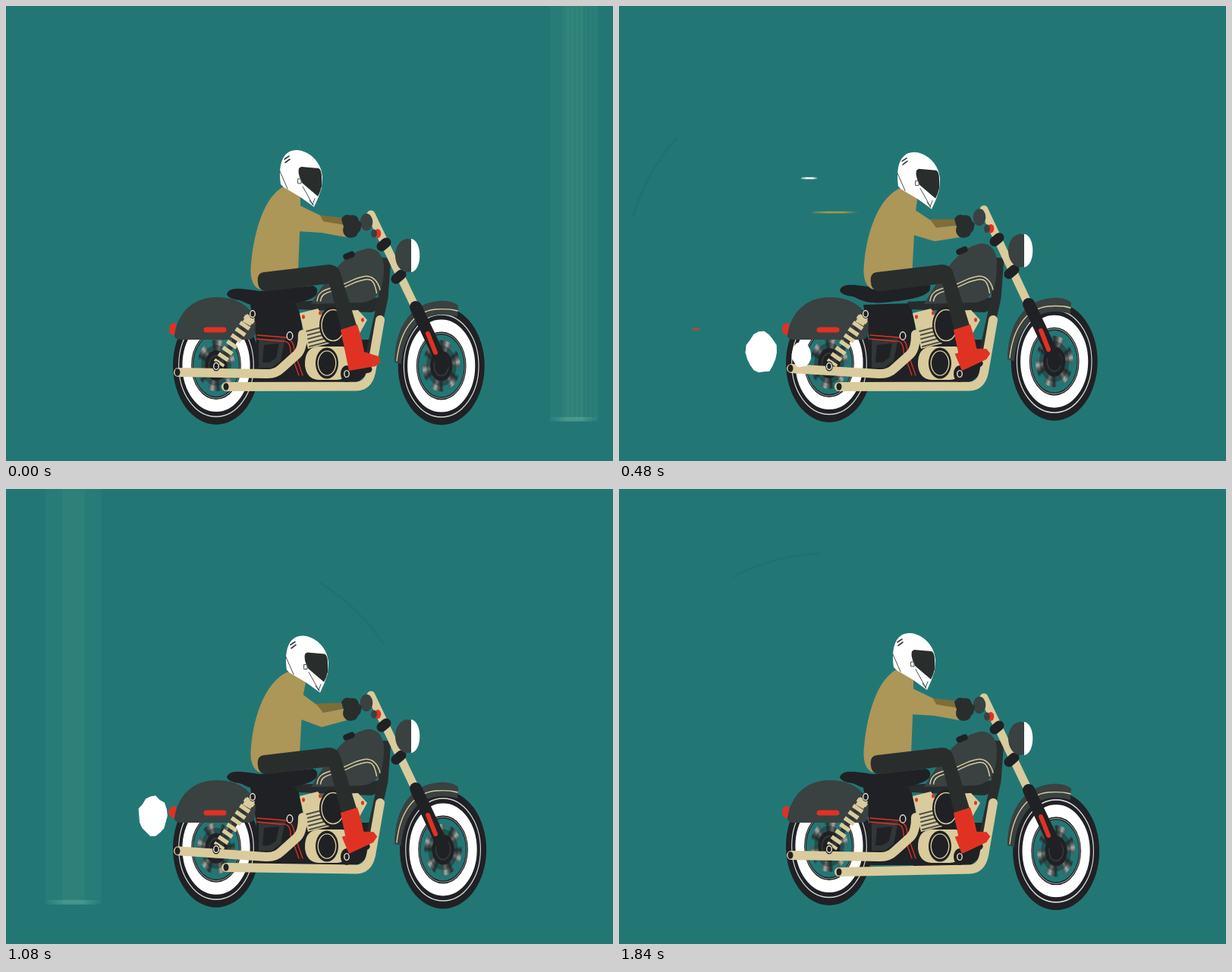
Write an HTML page with a canvas that moves like this. It is 800 px wide and 600 px high and loops after 1880 ms.

```html
<!DOCTYPE html>
<html>
<head>
<meta charset="utf-8">
<style>
html, body { margin: 0; width: 100%; height: 100%; overflow: hidden; background: #227775; }
canvas { display: block; }
</style>
</head>
<body>
<canvas id="stage" width="800" height="600"></canvas>
<script>
const c = document.getElementById('stage').getContext('2d');
const LOOP = 1880, STEP = 40, TAU = Math.PI * 2;
const BG = '#227775', BLACK = '#202124', GREY = '#394141', CREAM = '#d9cb9c', PALE = '#e7e4d4',
      TAN = '#ac9658', OLIVE = '#806c37', DARK = '#292e2d', RED = '#e03223', WHITE = '#fff';

const lerp = (a, b, k) => a + (b - a) * k;
const ramp = (t, a, b) => Math.max(0, Math.min(1, (t - a) / (b - a)));
const ease = (t, a, b) => { const k = ramp(t, a, b); return k * k * (3 - 2 * k); };
const bump = (t, peak, width) => Math.exp(-(((t - peak) / width) ** 2));
const noise = n => { const s = Math.sin(n * 127.1) * 43758.5; return s - Math.floor(s); };

const fill = (d, color) => { c.fillStyle = color; c.fill(new Path2D(d)); };
function line(d, color, width, cap = 'round', dash = []) {
  c.strokeStyle = color; c.lineWidth = width; c.lineCap = cap; c.lineJoin = 'round';
  c.setLineDash(dash);
  c.stroke(new Path2D(d));
}
function oval(x, y, rx, color, stroke, ry = rx * 1.37) {
  c.beginPath();
  c.ellipse(x, y, rx, ry, 0, 0, TAU);
  c.setLineDash([]);
  if (stroke) { c.strokeStyle = color; c.lineWidth = stroke; c.stroke(); }
  else { c.fillStyle = color; c.fill(); }
}
function bolt(x, y, r, ring, color = PALE) {
  oval(x, y, r, BLACK);
  oval(x, y, ring, color, 1.4);
}
function at(x, y, angle, draw) {
  c.save(); c.translate(x, y); c.rotate(angle); draw(); c.restore();
}
function fade(x1, x2, rgb, alpha) {
  const g = c.createLinearGradient(x1, 0, x2, 0);
  alpha.forEach((a, i) => g.addColorStop(i / (alpha.length - 1), `rgba(${rgb},${a})`));
  c.fillStyle = g;
}

function pillar(x, w, stripes) {
  c.fillStyle = 'rgba(150,210,150,.055)';
  c.fillRect(x, 0, w, 546);
  c.fillRect(x + w * .3, 0, w * .4, 546);
  c.fillStyle = 'rgba(150,210,150,.04)';
  for (let i = 0; i < stripes; i++) c.fillRect(x + w * (.25 + .75 * i / stripes), 0, 3, 546);
  fade(x, x + w, '100,180,160', [.05, .45, .45, 0]);
  c.fillRect(x, 542, w, 6);
}

// The head runs ahead, the tail follows half a duration later.
function streak(t, birth, duration, from, to, y, rgb) {
  const u = (t - birth) / duration;
  const head = lerp(from, to, ramp(u, 0, 1)), tail = lerp(from, to, ramp(u, .5, 1.5));
  fade(head, tail, rgb, [.3, 1, 1, 0]);
  c.fillRect(head, y - 1.2, tail - head, 2.5);
}

function scenery(t) {
  pillar(717 - 3 * t, 64, 8);
  pillar(875 - 3 * t, 83, 11);
  pillar(3292 - 3 * t, 74, 0);
  if (t > 80) {
    const a = (209 - 41 * (t / STEP - 12)) * Math.PI / 180;
    c.beginPath();
    c.arc(275, 352, 267, a - .22, a + .22);
    c.setLineDash([]); c.lineCap = 'round';
    c.strokeStyle = '#20716f'; c.lineWidth = 3; c.stroke();
  }
  streak(t, 90, 160, 350, 240, 211.5, '255,255,255');
  streak(t, 270, 160, 360, 240, 227, '255,255,255');
  streak(t, 340, 160, 360, 240, 272, '172,150,80');
  streak(t, 256, 160, 216, 96, 426, '214,64,44');
  streak(t, 1072, 320, 216, 96, 426, '214,64,44');
}

function wheel(x, y, t) {
  c.save();
  c.translate(x, y);
  c.scale(.731, 1);
  const disc = (r, color, stroke) => oval(0, 0, r, color, stroke, r);
  disc(78, BLACK);
  disc(67.5, '#d5d8d6', 1.6);
  disc(53, WHITE, 16);
  disc(43, '#8a9290', 1.2);
  disc(41, BG);
  const spokes = c.createConicGradient(t * .0131 + .4, 0, 0);
  const shades = ['#263031', '#525c5b', '#a3aaa7', '#47605e', BG, BG];
  for (let i = 0; i <= 36; i++) spokes.addColorStop(i / 36, shades[i % 6]);
  disc(34, spokes);
  disc(27, 'rgba(32,36,38,.45)');
  disc(20, BLACK);
  disc(13, '#34393a', 2);
  c.restore();
}

function engine(upper, lower, pedal) {
  fill('M322 394L384 392L390 420L398 496H326L330 440Z', BLACK);
  fill('M380 390L502 384L500 396L482 404L384 400Z', '#272b2c');
  fill('M388 440H482L476 486L462 497H388Z', BLACK);
  line('M501 332L497 385L480 462', DARK, 13, 'butt');
  fill('M333 440L368 438L362 468L350 477H333Z', '#313637');
  fill('M340 447L360 445L356 464L347 470L338 470Z', BLACK);
  for (const i of [0, 5])
    line(`M331 ${434 + i}L${368 - i} ${437 + i}Q${380 - i} 440 ${380 - i} 456L${391 - i} 487`, RED, 1.3);

  // Cylinders, fins and crankcase
  fill('M387 405L411 399L420 412L426 445L398 452L392 428Z', CREAM);
  fill('M440 402L464 401L476 414L466 432L446 445Z', CREAM);
  for (let i = 0; i < 5; i++)
    line(`M${396 + i} ${429 + i * 5}l27 -7`, '#4e5149', 2);
  bolt(431, 421, 18, 15, CREAM);
  fill('M394 474Q393 450 412 449H444Q454 452 453 470Q454 492 436 493H412Q396 492 394 474Z', CREAM);
  bolt(423, 471, 15, 11.8, CREAM);
  for (const [x, y] of [[392, 410], [414, 405], [470, 414]]) oval(x, y, 2, RED);
  bolt(374, 435, 4.5, 3.8);

  // Exhaust pipes
  line(`M227 ${483 + upper}L342 485Q355 486 364 477L384 459Q391 452 391 433`, CREAM, 12);
  line(`M290 ${502 + lower}L462 501.5Q477 501 481 483L493 414`, CREAM, 12);
  oval(226, 483 + upper, 3.5, BLACK);
  oval(290, 502 + lower, 3.5, BLACK);

  at(449, 485, pedal, () => line('M0 0L29 -6', BLACK, 9));
  bolt(449, 485, 8, 3.2);
}

function rear() {
  fill('M224 418Q215 417 215 426Q215 435 224 434Z', RED);
  fill('M222 434C226 405 246 384 277 384C305 384 324 396 329 418L328 433Q326 440 319 440H231Q222 440 222 434Z', GREY);
  line('M264 427H287', RED, 7);
  line('M321 413L281 471', '#303434', 7, 'butt');
  line('M322 411L280 472', CREAM, 15, 'butt', [5.5, 4.5]);
  line('M323 409L317 419', CREAM, 12, 'butt');
  bolt(325, 406, 4.5, 3.3);
  bolt(277, 475, 4.8, 3.3);
}

function front(dy, fender) {
  at(0, fender, 0, () => {
    fill('M512 470C512 430 530 392 570 389C582 388 590 390 596 395L595 410C570 402 546 410 535 428C527 440 522 455 521 472Z', GREY);
    line('M515 468C519 430 536 403 566 400C578 399 588 400 595 402', CREAM, 1.4);
  });
  line(`M481 ${275 + dy}L537 ${392 + fender}`, CREAM, 11);
  line(`M540 ${397 + fender}l36 76`, BLACK, 16);
  line(`M556 ${432 + fender}l10 25`, RED, 6);
  at(0, dy, 0, () => {
    line('M495 317L501 312M514 360L521 354', BLACK, 13);
    oval(529, 329, 16, GREY);
    fill('M534 307C549 309 549 349 534 351Z', WHITE);
    oval(490, 300, 4.3, RED);
    oval(485, 300, 4, GREY);
    oval(475, 285, 8.3, GREY);
  });
}

function tank(dy, hop) {
  fill(`M402 393C425 355 446 ${326 + dy} 475 ${320 + dy}C490 ${318 + dy} 498 ${330 + dy} 498 ${345 + dy}C498 375 490 388 470 391Z`, GREY);
  at(452, 329 + dy, -.4, () => line('M-4 0H4', BLACK, 8));
  for (const i of [0, 4.5])
    line(`M${410 + i} 389C${411 + i} ${378 + i} 418 ${374 + i} 432 ${371 + i}C450 ${367 + i} 455 ${360 + i} 470 ${357 + i}C482 ${354 + i} ${490 - i} 362 ${493 - i} ${374 + i}`, CREAM, 1.5);
  at(0, -5 * hop, 0, () =>
    fill('M291 380C295 369 312 373 335 376L404 369Q413 371 409 381C400 390 380 393 350 396C325 398 318 392 308 388C298 387 292 384 291 380Z', BLACK));
}

function helmet() {
  fill('M362 235C358 205 367 190 383 190C402 191 416 208 417 225L416 240Q412 253 406 265L388 252L366 239Z', WHITE);
  fill('M389 212L412 214Q416 216 416 226V238Q414 246 411 251Q398 240 390 233Q384 221 386 214Z', DARK);
  line('M367 202l6 -4M368 206.5l6 -4.5', '#34393a', 1.6);
  line('M361 218L371 241M391 238L405 263M400 256L404 262L407 254M385 228h4v6h-4Z', '#4a4f4f', 1);
}

function rider(k, lift, tip) {
  fill(`M${366 + 8 * k} ${238 + 2 * k}L${388 + 7 * k} ${250 + 5 * k}L${388 + 3 * k} 275L${385 + 2 * k} 350L340 374
    C324 375 321 355 323 340C327 295 ${341 + 3 * k} 251 ${366 + 8 * k} ${238 + 2 * k}Z`, TAN);
  const elbow = 299 + 15 * k, fold = 284 + 11 * k;
  fill(`M${414 - 7 * k} ${276 + 7 * k}L442 ${279 + 3 * k}L444 289L417 ${fold}Z`, OLIVE);
  fill(`M${385 + 5 * k} ${262 + 8 * k}L${414 - 4 * k} ${276 + 9 * k}L418 ${fold}L448 289L449 305L416 ${elbow}L384 ${297 + 5 * k}Z`, TAN);
  fill('M442 281Q446 273 454 276Q463 274 465 283L469 287L467 296Q464 298 462 303Q455 308 448 304Q442 298 445 291Z', DARK);
  at(8 * k, 3.5 * k, 0, helmet);

  const knee = 341 - 4 * tip;
  fill(`M332 365Q330 352 340 351L425 ${knee}Q436 ${knee} 440 ${knee + 9}L462 421L442 427L426 366L345 376Q333 376 332 365Z`, DARK);
  const heel = 481 - 5 * tip;
  fill(`M441 ${427 - 4 * tip}L463 ${420 - 4 * tip}L468 436L472 455L452 ${heel}Z`, RED);
  at(452, heel, -.27 * lift - .19 * tip, () => fill('M0 0L35 -6L42 -12L39 -19L20 -25L-3 -24Z', RED));
}

// Every puff swells and shrinks on its way to the same spot behind the bike.
function puff(t, birth, life, x, y, size) {
  const u = (t - birth) / life;
  if (u <= 0 || u >= 1) return;
  const px = lerp(x, 178, 1 - (1 - u) ** 3), py = lerp(y, 410, u);
  const r = size * Math.sqrt(Math.sin(Math.PI * u));
  c.beginPath();
  for (let i = 0; i < 18; i++) {
    const a = i / 18 * TAU, q = r * (.9 + .14 * noise(i + birth));
    c.lineTo(px + q * Math.cos(a), py + q * 1.35 * Math.sin(a));
  }
  c.fillStyle = WHITE;
  c.fill();
}

function draw(t) {
  c.fillStyle = BG;
  c.fillRect(0, 0, 800, 600);
  scenery(t);

  const hop = bump(t, 480, 160);
  const lean = ease(t, 180, 620) - .6 * bump(t, 760, 120) - ease(t, 1560, 1840);
  const lift = ease(t, 0, 80) - ease(t, 1840, LOOP);
  const tip = bump(t, 160, 100) * lift;
  const dy = -3 * lean - 4.2 * hop, fender = -2 * lean - 2.5 * hop;
  const sway = Math.sin(Math.PI * t / LOOP) ** 2;

  wheel(277, 474 - 3 * hop - 3 * ease(t, 1000, 1500), t);
  wheel(573.7 + 2.4 * ease(t, 600, 1100), 474.5 - 6 * hop + 3 * (t / LOOP) ** 2, t + 90);
  engine(-6 * sway - 2 * hop, 3 * ease(t, 1200, 1840) - 3 * bump(t, 1080, 160), -.28 * lift - .17 * tip);
  rear();
  front(dy, fender);
  tank(dy, hop);
  rider(lean, lift, tip);

  puff(t, 90, 770, 258, 505, 21);
  puff(t, 380, 560, 290, 470, 18);
  puff(t, 700, 940, 252, 445, 20);
  puff(t, 1460, 360, 320, 455, 17);
}

const start = performance.now();
function tick() {
  const t = (performance.now() - start) % LOOP;
  draw(Math.floor(t / STEP) * STEP);
  requestAnimationFrame(tick);
}
tick();
</script>
</body>
</html>
```
